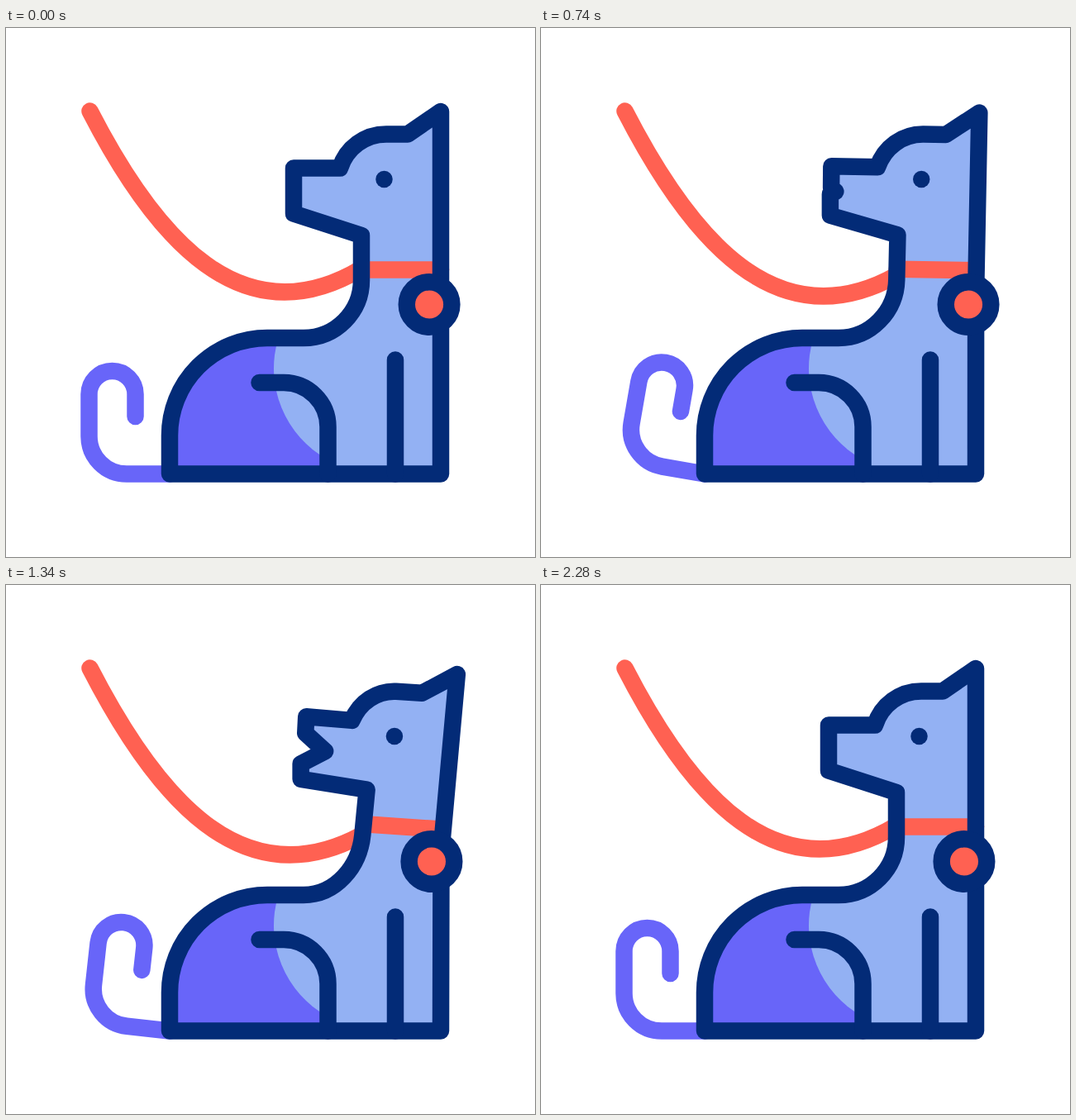
Animation of 640 by 640 pixels, one loop 2400 ms. Source, as an HTML page without scripts:

```html
<!DOCTYPE html>
<html lang="en">
<head>
<meta charset="utf-8">
<title>Barking dog on a leash</title>
<style>
  @property --wag { syntax: "<angle>"; inherits: false; initial-value: 0deg; }
  @property --time { syntax: "<number>"; inherits: false; initial-value: 0; }

  :root { --navy: #032b77; --sky: #93b1f3; --violet: #6865f9; --coral: #ff6152; --amber: #ffcb4f; }
  html, body { margin: 0; width: 100%; height: 100%; overflow: hidden; background: #fff; }
  svg { display: block; width: 100%; height: 100%; }

  .line { fill: none; stroke: var(--navy); stroke-width: 20.5; stroke-linecap: round; stroke-linejoin: round; }
  .red { stroke: var(--coral); }
  .fill { fill: var(--sky); }

  /* Each head part morphs between its own closed and open shape. */
  .dog {
    --shut: path("M198 539.5V493A118 118 0 0 1 316 375H360C398.8 375 430 343.5 430 305L430 251L348 224.5L348 197L348 197L348 197L348 169.5L404 169.5C412 145 434 128.5 460 128.5L486 128.5L526 101L526 322L526 539.5Z");
    --open: path("M198 539.5V493A118 118 0 0 1 316 375H360C398.8 375 425 338 432.6 300L443 244.5L365 244.7L365 235L423 205L376 162L378 149.5L432.6 158.5C443 138.5 463 127 483.4 129L520 133L565 115L527 322L526 539.5Z");
  }
  .collar { --shut: path("M430 292.5L526 292.5"); --open: path("M437 286L527 298.5"); }
  .eye { --shut: path("M457.5 183h0"); --open: path("M482 183h0"); }
  .dog, .collar, .eye { animation: bark 2.4s cubic-bezier(.37, 0, .63, 1) infinite; }
  @keyframes bark {
    0%, 13.5%, 33%, 41.9%, 60.6%, 100% { d: var(--shut); }
    23.25%, 51.25% { d: var(--open); }
  }

  .leash { animation: sag 2.4s cubic-bezier(.37, 0, .63, 1) infinite; }
  @keyframes sag {
    0%, 95.5%, 100% { d: path("M101.5 100.5C181 255 286 377 430 291"); }
    50% { d: path("M101.5 100.5C181 255 285 381 430 303"); }
  }

  /* Seven wags, a touch quicker at both ends. */
  .tail {
    stroke: var(--violet);
    transform-origin: 198px 539px;
    transform: rotate(calc(5.1deg * (1 - cos(var(--wag)))));
    animation: wag 2.4s cubic-bezier(.3, .335, .7, .665) infinite;
  }
  @keyframes wag { 90.4%, 100% { --wag: 2520deg; } }

  /* Four swings that die out. */
  .tag {
    fill: var(--coral);
    transform: translateX(calc(7.5px * (1 - var(--time)) * sin(var(--time) * 1440deg)));
    animation: swing 2.4s linear infinite;
  }
  @keyframes swing { 96.7%, 100% { --time: 1; } }

  /* Strokes grow away from the mouth, then shrink toward their far ends. */
  .sound {
    stroke: var(--amber);
    stroke-dasharray: 14 60;
    animation: sound 2.4s linear infinite;
  }
  @keyframes sound {
    0%, 20.5%, 45.5% { visibility: hidden; stroke-dashoffset: 14; }
    22%, 25.5%, 47%, 50.5% { visibility: visible; stroke-dashoffset: 0; }
    27.5%, 52.5%, 100% { visibility: hidden; stroke-dashoffset: -14; }
  }
</style>
</head>
<body>
<svg viewBox="0 0 640 640">
  <path class="line tail" d="M198 539.5H146A45.5 45.5 0 0 1 100.5 494V443A28 28 0 0 1 156.5 443V470"/>
  <path class="line red leash"/>
  <path class="fill dog"/>
  <path fill="var(--violet)" d="M329.5 375A126 126 0 0 0 390 522.6V539H198V493A118 118 0 0 1 316 375Z"/>
  <path class="line red collar"/>
  <path class="line dog"/>
  <path class="line" d="M306.5 429H336A53.5 53.5 0 0 1 389.5 482.5V539.5M471 401.5V539.5"/>
  <path class="line eye"/>
  <circle class="line tag" cx="512" cy="334.5" r="27.3"/>
  <path class="line sound" d="M342 143L335.5 130.5"/>
  <path class="line sound" d="M329.5 165L315.5 161"/>
  <path class="line sound" d="M326.5 191.5L313 196.5"/>
</svg>
</body>
</html>
```
